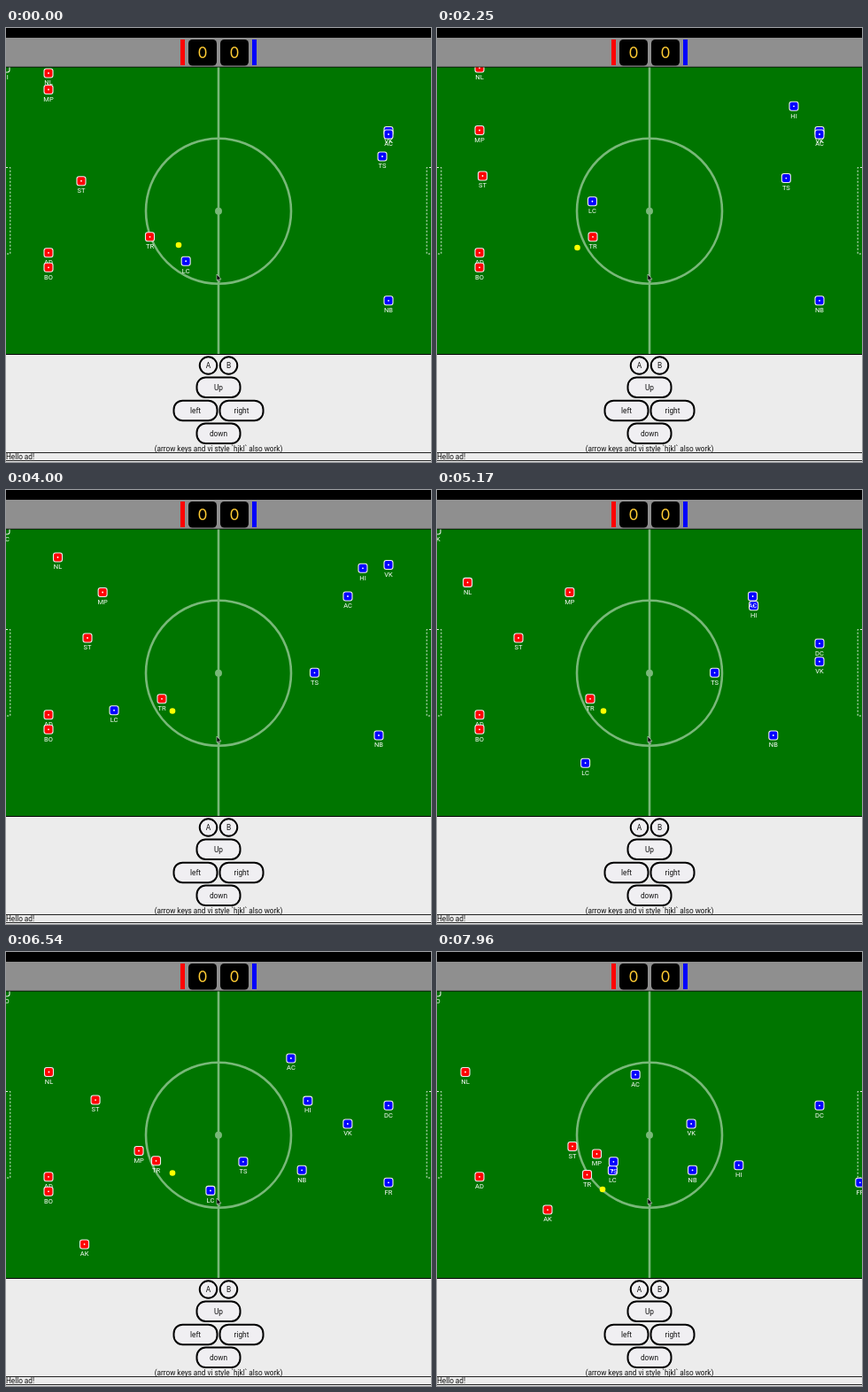
Recreate the animation shown at these times as an HTML page. Size 480 px wide and 490 px high, loop 8 s.

```html
<!DOCTYPE html>
<html lang="en">
<head>
<meta charset="utf-8">
<title>Pitch</title>
<style>
html, body { margin: 0; width: 100%; height: 100%; overflow: hidden; background: #ececec; }
svg { display: block; width: 480px; height: 490px; }
text { font-family: Roboto, "Liberation Sans", sans-serif; text-anchor: middle; }
.score text { font: 17.5px Inter, sans-serif; fill: #fc3; }
.pad rect { fill: #f0eff2; stroke: #000; stroke-width: 2; }
.pad text { font-size: 8.3px; fill: #111; }
.note { font-size: 8.2px; fill: #111; }
.lines { fill: none; stroke: #78b878; stroke-width: 2.6; }
.goal { fill: none; stroke: #e4f0e4; stroke-dasharray: 2 2; }
.player rect { stroke: #eee; stroke-width: 1.1; }
.player circle { fill: #fff; }
.player text { font-size: 7.5px; fill: #fff; }
</style>
</head>
<body>
<svg viewBox="0 0 480 490">
  <defs><clipPath id="pitch"><rect y="44.5" width="480" height="323.5"/></clipPath></defs>
  <rect width="480" height="490" fill="#ececec"/>
  <rect width="480" height="45"/>
  <rect y="11" width="480" height="32.7" fill="#8f8f8f"/>
  <rect x="197" y="13" width="5" height="29" fill="#f00"/>
  <rect x="278" y="13" width="5" height="29" fill="#00f"/>
  <g class="score">
    <rect x="206" y="13" width="32" height="29.5" rx="4.5"/>
    <rect x="242" y="13" width="32" height="29.5" rx="4.5"/>
    <text x="222" y="34.4">0</text>
    <text x="258" y="34.4">0</text>
  </g>

  <g clip-path="url(#pitch)">
    <rect y="44" width="480" height="325" fill="#007500"/>
    <g class="lines">
      <path d="M240 44V369"/>
      <circle cx="240" cy="206.7" r="82"/>
      <circle cx="240" cy="206.7" r="4" fill="#78b878" stroke="none"/>
    </g>
    <path class="goal" d="M0 157.5H4.8V255H0"/>
    <path class="goal" d="M480 157.5H475.2V255H480"/>
    <g id="players"></g>
    <circle id="ball" r="3.3" fill="#ff0"/>
  </g>
  <rect y="368" width="480" height="1"/>
  <path d="M238 278v7.2l1.6-1.3 1.1 2.5 1.2-.6-1.1-2.3h2.1z" stroke="#fff" stroke-width=".5"/>

  <g class="pad" id="pad"></g>
  <text class="note" x="240" y="478.2">(arrow keys and vi style `hjkl` also work)</text>
  <path d="M0 479.5H480M0 488.5H480" stroke="#222"/>
  <text class="note" y="487.2" style="text-anchor:start">Hello ad!</text>
</svg>
<script>
const LOOP = 8, FPS = 24;
const RED = { fill: '#f00', homeX: 48 };
const BLUE = { fill: '#00f', homeX: 432 };
const BENCH = { fill: 'none', homeX: -1 };
const $ = id => document.getElementById(id);
const movers = [];

function add(parent, tag, attrs, label) {
  const el = document.createElementNS('http://www.w3.org/2000/svg', tag);
  for (const name in attrs) el.setAttribute(name, attrs[name]);
  if (label) el.textContent = label;
  return parent.appendChild(el);
}

function button(label, x, y, w = 49, h = 22.5) {
  add($('pad'), 'rect', { x: x - w / 2, y: y - h / 2, width: w, height: h, rx: 10 });
  add($('pad'), 'text', { x, y: y + 2.9 }, label);
}

// Walks from (x, y) through stops [second, x, y]; a stop with only a second stands still until then.
function walk(x, y, ...stops) {
  return t => {
    let t0 = 0, x0 = x, y0 = y;
    for (const [t1, x1 = x0, y1 = y0] of stops) {
      if (t < t1) {
        const p = (t - t0) / (t1 - t0);
        return [x0 + (x1 - x0) * p, y0 + (y1 - y0) * p];
      }
      [t0, x0, y0] = [t1, x1, y1];
    }
    return [x0, y0];
  };
}

// Circles a moving target, swinging out and back in over the loop.
function circle(target) {
  return t => {
    const [x, y] = target(t);
    const radius = 20 + 46 * Math.sin(Math.PI * t / 8.2);
    const angle = 1.15 - 1.07 * t;
    return [x + radius * Math.cos(angle), y + radius * Math.sin(angle)];
  };
}

function player(label, team, path, from = 0, to = LOOP) {
  const el = add($('players'), 'g', { class: 'player' });
  add(el, 'rect', { x: -5, y: -5, width: 10, height: 10, rx: 2.5, fill: team.fill });
  add(el, 'circle', { r: 0.9 });
  add(el, 'text', { y: 13.4 }, label);
  movers.push({ el, path, from, to });
}

const starter = (label, team, y, ...stops) => player(label, team, walk(team.homeX, y, ...stops));

// Newcomers wait in the pitch corner, then join their team's home column.
function newcomer(label, team, waits, joins, y, ...stops) {
  player(label, BENCH, walk(BENCH.homeX, 45), waits, joins);
  if (team) player(label, team, walk(team.homeX, y, [joins], ...stops), joins);
}

button('A', 228.5, 381, 19.5, 19.5);
button('B', 251.5, 381, 19.5, 19.5);
button('Up', 240, 405.7);
button('left', 214, 431.9);
button('right', 266, 431.9);
button('down', 240, 457.8);

const ball = walk(195, 245, [1.08], [2.25, 158.5, 248], [4, 188, 249.5], [6.54], [7.96, 187, 268]);

starter('NL', RED, 51, [1.08, 48, 45], [2.25], [4, 58.5, 76], [5.17, 34.5, 104.5], [6.54, 48.5, 135.5], [7.96, 32]);
starter('MP', RED, 69.5, [1.08, 48, 66], [2.25, 48, 115.5], [5.17, 150], [6.54, 150, 224.5], [7.96, 180.5, 228]);
player('ST', RED, walk(85, 172.7, [1.08], [2.25, 51.5, 167], [4, 92], [5.17], [6.54, 101], [7.96, 153, 219.5]));
starter('AD', RED, 253.8);
player('BO', RED, walk(RED.homeX, 270.3), 0, 7.1);
player('TR', RED, walk(162.5, 235.8, [1.08, 223.5], [2.25, 176], [4], [6.54, 169.5], [7.96, 169.5, 251.5]));
newcomer('AK', RED, 4.7, 5.4, 330, [6.54, 88.5], [7.96, 125, 291]);

newcomer('HI', BLUE, 0, 0.3, 88.3, [0.9, 403], [4], [5.17, 357.5, 130.8], [6.54, 340.8, 168], [7.96, 340.8, 240.8]);
starter('VK', BLUE, 116.5, [2.25], [4, 432, 84.5], [5.17, 432, 194], [6.54, 386], [7.96, 287]);
starter('AC', BLUE, 120, [2.25], [4, 386], [6.54, 322], [7.96, 224, 138.5]);
player('LC', BLUE, circle(ball));
player('TS', BLUE, walk(425, 145, [1.08], [4, 348.5, 206.3], [5.17, 313.5], [6.54, 268, 236.8], [7.96, 199.3]));
starter('NB', BLUE, 307.8, [3], [4, 421, 277], [5.17, 379.7], [6.54, 334.2, 246.3], [7.96, 288.5]);
newcomer('DC', BLUE, 3.7, 4.4, 173.3);
newcomer('FR', BLUE, 5.5, 6, 260.3, [7.54], [7.96, 478]);
newcomer('JO', null, 6.2);
movers.push({ el: $('ball'), path: ball, from: 0, to: LOOP });

const start = performance.now();
function draw(now) {
  const seconds = Math.max(0, now - start) / 1000 % LOOP;
  const t = Math.floor(seconds * FPS + 0.1) / FPS % LOOP;
  for (const { el, path, from, to } of movers) {
    el.style.display = t >= from && t < to ? '' : 'none';
    el.setAttribute('transform', `translate(${path(t)})`);
  }
  requestAnimationFrame(draw);
}
draw(start);
</script>
</body>
</html>
```
